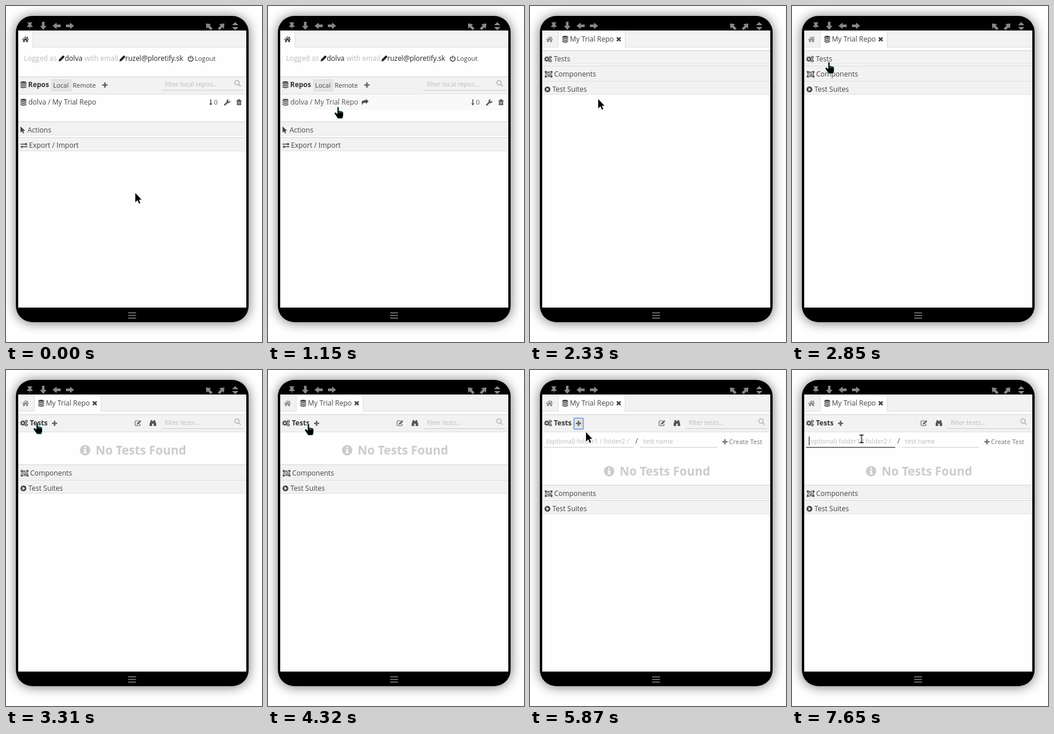
Write an HTML page that moves like this. It is 440 by 576 pixels and loops after 8 s.

```html
<!DOCTYPE html>
<html lang="en">
<head>
<meta charset="utf-8">
<title>Repository panel</title>
<style>
html, body { margin: 0; width: 100%; height: 100%; overflow: hidden; background: #fff; }
svg { display: block; width: 440px; height: 576px; font: 12px "Open Sans", sans-serif; color: #444; fill: #444; }
.device { fill: #000; filter: drop-shadow(0 1px 10px rgba(0, 0, 0, .55)); }
.i { fill: currentColor; }
.l { fill: none; stroke: currentColor; }
.s { font-size: 11px; }
.b { font-weight: 700; fill: #333; }
.dark { color: #222; fill: #222; }
.mid { color: #666; fill: #666; }
.pale { color: #bbb; fill: #bbb; }
.ghost { color: #ccc; fill: #ccc; }
.rule { fill: none; stroke: #ccc; }
.head { fill: #f2f2f2; }
.edge { fill: none; stroke: #ddd; }

/* One shared 8 s clock: every change is a hard step, percent = ms / 80 */
.k { animation: 8s step-end infinite; }
.home { animation-name: home; }
.repo { animation-name: repo; }
.closed { animation-name: closed; }
.open { animation-name: open; }
.form { animation-name: form; }
.below { animation-name: below; }
.notice { animation-name: notice; }
.hover { animation-name: hover; }
.row { animation-name: row; }
.over { animation-name: over; }
.ring { animation-name: ring; }
.tip { animation-name: tip; }
.input { animation-name: input; }
.caret { animation-name: caret; }
.click { animation-name: click; }
.cursor { animation-name: move; }
.arrow { animation-name: arrow; }
.hand { animation-name: hand; }
.beam { animation-name: beam; }

@keyframes home { 0% { opacity: 1 } 19.25% { opacity: 0 } }
@keyframes repo { 0% { opacity: 0 } 19.25% { opacity: 1 } }
@keyframes closed { 0% { opacity: 1 } 41.375% { opacity: 0 } }
@keyframes open { 0% { opacity: 0 } 41.375% { opacity: 1 } }
@keyframes form { 0% { opacity: 0 } 67.125% { opacity: 1 } }
@keyframes below {
  0% { transform: none } 41.375% { transform: translateY(60px) } 67.125% { transform: translateY(95px) }
}
@keyframes notice { 0% { transform: none } 67.125% { transform: translateY(36px) } }
@keyframes hover { 0% { opacity: 0 } 14.375% { opacity: 1 } }
@keyframes row { 0% { color: #444; fill: #444 } 14.375% { color: #5a5254; fill: #5a5254 } }
@keyframes over { 0% { opacity: 0 } 55% { opacity: 1 } 83% { opacity: 0 } }
@keyframes ring { 0% { opacity: 0 } 65.625% { opacity: 1 } 83% { opacity: 0 } }
@keyframes tip { 0% { opacity: 0 } 56% { opacity: .6 } 57% { opacity: 1 } 72.5% { opacity: .5 } 73.375% { opacity: 0 } }
@keyframes input { 0% { stroke: #ccc } 83% { stroke: #111 } }
@keyframes caret { 0% { opacity: 0 } 83% { opacity: 1 } 88.875% { opacity: 0 } 95.625% { opacity: 1 } }
@keyframes click {
  0% { opacity: 0 } 18.375% { opacity: .6 } 19.25% { opacity: 0 }
  39.5% { opacity: .6 } 41.375% { opacity: 0 }
  65.625% { opacity: .6 } 67.125% { opacity: 0 }
  82% { opacity: .6 } 84% { opacity: 0 }
}
@keyframes arrow {
  0% { opacity: 1 } 14.375% { opacity: 0 } 20.25% { opacity: 1 }
  33.875% { opacity: 0 } 73.375% { opacity: 1 } 74.375% { opacity: 0 }
}
@keyframes hand {
  0% { opacity: 0 } 14.375% { opacity: 1 } 20.25% { opacity: 0 }
  33.875% { opacity: 1 } 73.375% { opacity: 0 }
}
@keyframes beam { 0% { opacity: 0 } 74.375% { opacity: 1 } }
@keyframes move {
  0% { transform: translate(222px, 320px) }
  7.625% { transform: translate(221px, 317px) }
  8.625% { transform: translate(213px, 306px) }
  9.625% { transform: translate(202px, 291px) }
  10.625% { transform: translate(190px, 275px) }
  11.625% { transform: translate(176px, 255px) }
  12.625% { transform: translate(154px, 222px) }
  13.5% { transform: translate(132px, 190px) }
  14.375% { transform: translate(119px, 172px) }
  15.5% { transform: translate(118px, 168px) }
  16.375% { transform: translate(118px, 166px) }
  29.125% { transform: translate(117px, 159px) }
  30% { transform: translate(113px, 152px) }
  31% { transform: translate(106px, 142px) }
  32% { transform: translate(97px, 130px) }
  32.875% { transform: translate(86px, 117px) }
  33.875% { transform: translate(73px, 104px) }
  34.75% { transform: translate(62px, 95px) }
  35.75% { transform: translate(55px, 90px) }
  36.625% { transform: translate(52px, 89px) }
  51.125% { transform: translate(54px, 89px) }
  52.125% { transform: translate(60px, 90px) }
  53.125% { transform: translate(68px, 91px) }
  54.125% { transform: translate(76px, 92px) }
  55% { transform: translate(83px, 93px) }
  56% { transform: translate(87px, 93px) }
  57% { transform: translate(88px, 93px) }
  72.5% { transform: translate(90px, 97px) }
  73.375% { transform: translate(96px, 106px) }
  74.375% { transform: translate(104px, 112px) }
  75.375% { transform: translate(112px, 116px) }
  76.25% { transform: translate(117px, 118px) }
  77.25% { transform: translate(119.5px, 118px) }
}
</style>
</head>
<body>
<svg viewBox="0 0 440 576">
  <defs>
    <path id="pin" class="i" d="M-4-6H4V-4.5H2.6V-1Q5 .2 5 2H.7L0 7-.7 2H-5Q-5 .2-2.6-1V-4.5H-4Z"/>
    <path id="arrow" class="i" d="M-7 0L0-5.6V-2.2H7V2.2H0V5.6Z"/>
    <path id="house" class="i" d="M-6 .6L0-5 2.5-2.7V-4.3H4.2V-1.1L6 .6 5.3 1.4 0-3.5-5.3 1.4ZM-4.2 1.5L0-2.3 4.2 1.5V5H1.2V2H-1.2V5H-4.2Z"/>
    <path id="pencil" class="i" d="M-5 5L-4.3 1.5 1.9-4.7Q3-5.5 4-4.5L4.6-3.9Q5.5-3 4.7-1.9L-1.5 4.3Z"/>
    <g id="power" class="l" stroke-width="1.5" stroke-linecap="round"><path d="M-2.4-3.4A4.2 4.2 0 1 0 2.4-3.4M0-5V-.4"/></g>
    <g id="stack" class="i">
      <ellipse cy="-4.4" rx="5" ry="1.7"/>
      <path id="disc" d="M-5-3.3Q0-.7 5-3.3V-1.5Q0 1.2-5-1.5Z"/>
      <use href="#disc" y="3"/><use href="#disc" y="6"/>
    </g>
    <path id="plus" class="i" d="M-1.3-4.5H1.3V-1.3H4.5V1.3H1.3V4.5H-1.3V1.3H-4.5V-1.3H-1.3Z"/>
    <g id="search" class="l" stroke-width="1.7"><circle cx="-1" cy="-1" r="3.8"/><path d="M2 2L5.4 5.4" stroke-width="2"/></g>
    <path id="down" class="i" d="M-.8-5H.8V2H2.8L0 5.5-2.8 2H-.8Z"/>
    <g id="wrench" class="l"><path d="M-4 4L1.4-1.4" stroke-width="2.5" stroke-linecap="round"/><path d="M4.6-2.6A2.3 2.3 0 1 1 2.4-4.6" stroke-width="2"/></g>
    <g id="trash"><path class="i" d="M-4.5-3.6H-2L-1.3-5.2H1.3L2-3.6H4.5V-2.4H3.7V5H-3.7V-2.4H-4.5Z"/><path d="M-1.7-1.4V3.6M0-1.4V3.6M1.7-1.4V3.6" stroke="#ddd" stroke-width=".7"/></g>
    <path id="pointer" class="i" d="M-4-6V4.6L-1.5 2.2 .2 6 2 5.2 .4 1.6H4Z"/>
    <path id="swap" class="i" d="M-6-2.9H2.6V-5L6-2.2 2.6 .4V-1.4H-6ZM6 3.1H-2.6V5L-6 2.4-2.6-.2V1.6H6Z"/>
    <path id="share" class="i" d="M6.3-1L1.6-5.3V-3Q-6-3-6 1.5-6 3.3-4.3 5-4.6 .9 1.6 .9V3.2Z"/>
    <g id="gears" class="l">
      <circle cx="-2" r="2.6" stroke-width="1.8"/><circle cx="-2" r="4" stroke-width="1.4" stroke-dasharray="1.6 1.54"/>
      <g id="cog"><circle cx="4" cy="-3" r="1.5" stroke-width="1.2"/><circle cx="4" cy="-3" r="2.4" stroke-width=".8" stroke-dasharray="1 .9"/></g>
      <use href="#cog" y="6"/>
    </g>
    <g id="group" class="l">
      <path d="M-5-4H5V4H-5Z"/><path d="M-3-2.4H1V1H-3ZM1-.8H3.2V2.4H-1V1" stroke-width=".9"/>
      <path class="i" stroke="none" d="M-6.5-5.5h3v3h-3zM3.5-5.5h3v3h-3zM-6.5 2.5h3v3h-3zM3.5 2.5h3v3h-3z"/>
    </g>
    <g id="play"><circle class="i" r="5"/><path d="M-1.6-2.9L3 0-1.6 2.9Z" fill="#f2f2f2"/></g>
    <path id="binoc" class="i" d="M-4-5H-1.3V-3.6H1.3V-5H4V-3.6L5.6 1V5H1.3V1H-1.3V5H-5.6V1L-4-3.6Z"/>
    <g id="edit"><path class="l" d="M3.4 1V3Q3.4 4.5 2 4.5H-3.8Q-5.2 4.5-5.2 3V-2.6Q-5.2-4-3.8-4H1" stroke-width="1.2"/><use href="#pencil" transform="translate(1.4 -1) scale(.75)"/></g>
    <g id="bar">
      <rect class="head" x="21" width="392" height="24"/>
      <path class="edge" d="M21 .5H413" stroke-width="1.5"/><path class="edge" d="M21 23.5H413" opacity=".7"/>
    </g>
    <g id="tall">
      <rect class="head" x="21" width="392" height="30.5"/>
      <path class="edge" d="M21 .5H413" stroke-width="1.5"/><path class="edge" d="M21 30H413"/>
    </g>
    <g id="filter"><path class="rule" d="M267 23.5H408"/><use class="pale" href="#search" x="398" y="11.5"/></g>
  </defs>

  <rect class="device" x="17" y="17" width="400" height="525" rx="28"/>
  <g color="#888">
    <use href="#pin" x="41" y="34"/>
    <use href="#arrow" transform="translate(64 34) rotate(-90)"/>
    <use href="#arrow" x="87" y="34"/>
    <use href="#arrow" transform="translate(110 34) rotate(180)"/>
    <use href="#arrow" transform="translate(348.5 35) rotate(45)"/>
    <use href="#arrow" transform="translate(370.5 35) rotate(135)"/>
    <path class="i" d="M388.500 33L394 27.500 399.500 33ZM388.500 36L394 41.500 399.500 36Z"/>
    <path class="l" d="M210 526H223.500M210 530.500H223.500M210 535H223.500" stroke="#aaa" stroke-width="1.5"/>
  </g>
  <rect x="21" y="42" width="392" height="475" fill="#fefefe"/>
  <rect class="head" x="21" y="42" width="392" height="29"/>
  <path class="edge" d="M21 70.500H413"/>

  <g class="k home">
    <rect x="21" y="42" width="25" height="29" fill="#fefefe"/><path class="edge" d="M46 42V71"/>
    <use href="#house" x="33.500" y="57"/>
    <text class="pale" x="31" y="94">Logged as</text>
    <use class="dark" href="#pencil" x="95.500" y="90"/><text class="dark" x="101" y="94">dolva</text>
    <text class="pale" x="135" y="94">with email</text>
    <use class="dark" href="#pencil" x="200" y="90"/><text class="dark" x="205" y="94">ruzel@ploretify.sk</text>
    <use href="#power" x="317.500" y="90.500"/><text class="s" x="324.500" y="94">Logout</text>

    <use href="#tall" y="121"/>
    <use href="#stack" x="30" y="135"/><text class="b" x="38" y="139">Repos</text>
    <rect x="78.500" y="126.500" width="33" height="19" fill="#e6e6e6" stroke="#d8d8d8"/>
    <text class="s" x="81" y="140">Local</text><text class="s" x="114.500" y="140">Remote</text>
    <use class="mid" href="#plus" x="170" y="135.500"/>
    <use href="#filter" y="121"/><text class="s pale" x="273" y="138">filter local repos...</text>

    <rect class="k hover" x="21" y="153" width="392" height="25" fill="#f9f9f9"/>
    <g class="k row">
      <use href="#stack" x="30" y="165"/><text x="38.500" y="169" style="fill:inherit">dolva / My Trial Repo</text>
    </g>
    <use class="k hover" href="#share" x="166.500" y="164.500"/>
    <g color="#555" fill="#555">
      <use href="#down" x="352" y="165"/><text class="s" x="357.500" y="169">0</text>
      <use href="#wrench" x="380" y="165.500"/><use href="#trash" x="400.500" y="165"/>
    </g>
    <use href="#bar" y="198"/><use href="#pointer" x="29" y="212.500"/><text x="37" y="217">Actions</text>
    <use href="#bar" y="225"/><use href="#swap" x="31" y="239"/><text x="39.500" y="243">Export / Import</text>
  </g>

  <g class="k repo">
    <use href="#house" x="33.500" y="57" color="#888"/>
    <rect x="48" y="42" width="116" height="29" fill="#fefefe"/><path class="edge" d="M48.500 42V71M163.500 42V71"/>
    <use href="#stack" x="60.500" y="57"/><text x="68.500" y="61">My Trial Repo</text>
    <use href="#plus" transform="translate(152.500 57) rotate(45)"/>

    <g class="k closed"><use href="#bar" y="76"/><text x="41" y="95">Tests</text></g>
    <g class="k open">
      <use href="#tall" y="76"/><text class="b" x="41" y="95">Tests</text>
      <rect class="k over" x="75" y="82" width="17" height="20" fill="#e2e2e2"/>
      <rect class="k ring" x="75.500" y="82.500" width="16" height="19" rx="1" fill="none" stroke="#6c97e2" stroke-width="1.6"/>
      <use class="mid" href="#plus" x="83.500" y="91.500"/>
      <use class="mid" href="#edit" x="227" y="91"/><use href="#binoc" x="252.500" y="91" color="#555"/>
      <use href="#filter" y="77"/><text class="s pale" x="273" y="94">filter tests...</text>
      <g class="k notice ghost">
        <circle cx="136" cy="137.500" r="9"/>
        <path d="M134.500 131.500h3v2.600h-3zM133.500 135.700h4v5.200h1.300v1.800h-5.600v-1.800h1.300v-3.400h-1z" fill="#fefefe"/>
        <text x="154" y="145" font-size="20.500" font-weight="700">No Tests Found</text>
      </g>
      <g class="k form">
        <text class="s pale" x="28.500" y="126">(optional) folder1 / folder2 /</text>
        <path class="k input rule" d="M24 132.500H177.500"/>
        <path class="k caret" d="M29.500 114V129" stroke="#000"/>
        <text x="181" y="126">/</text>
        <text class="s pale" x="194.500" y="126">test name</text><path class="rule" d="M189 132.500H321.500"/>
        <use href="#plus" x="335" y="123" color="#777"/><text class="s" x="342" y="127" fill="#777">Create Test</text>
      </g>
    </g>
    <use href="#gears" x="31" y="91"/>

    <g class="k below">
      <use href="#bar" y="102"/><use href="#group" x="32" y="117"/><text x="41.500" y="121">Components</text>
      <use href="#bar" y="128"/><use href="#play" x="30" y="143"/><text x="38.500" y="147">Test Suites</text>
    </g>
    <g class="k tip">
      <rect x="33" y="59" width="101" height="21" rx="4" fill="#000"/>
      <text x="37.500" y="74" style="fill:#fff">Create New Test</text>
    </g>
  </g>

  <g class="k cursor">
    <circle class="k click" r="12" fill="#ffee10"/>
    <path class="k arrow" d="M0 0V17L4 13.200 6.600 19 9.200 17.900 6.800 12.300H11.500Z" fill="#000" stroke="#fff" stroke-width=".5"/>
    <g class="k hand">
      <path d="M0 2Q1.500-.5 3 2V7.500L8.500 8.500Q10.500 9 10.500 11.500V16L9 21H1L-4.800 12.500Q-5.500 9.500-2.500 10.500L0 12.500Z" fill="#000" stroke="#b4ffff" stroke-width=".9"/>
      <path d="M3.200 8.500V11.500M5.600 9V11.500M8 9.500V12" stroke="#ccc" stroke-width=".6"/>
    </g>
    <path class="k beam" d="M-3.500-6.500H3.500M-3.500 6.500H3.500M0-6.500V6.500" fill="none" stroke="#000" stroke-width="1.300"/>
  </g>
</svg>
</body>
</html>
```
